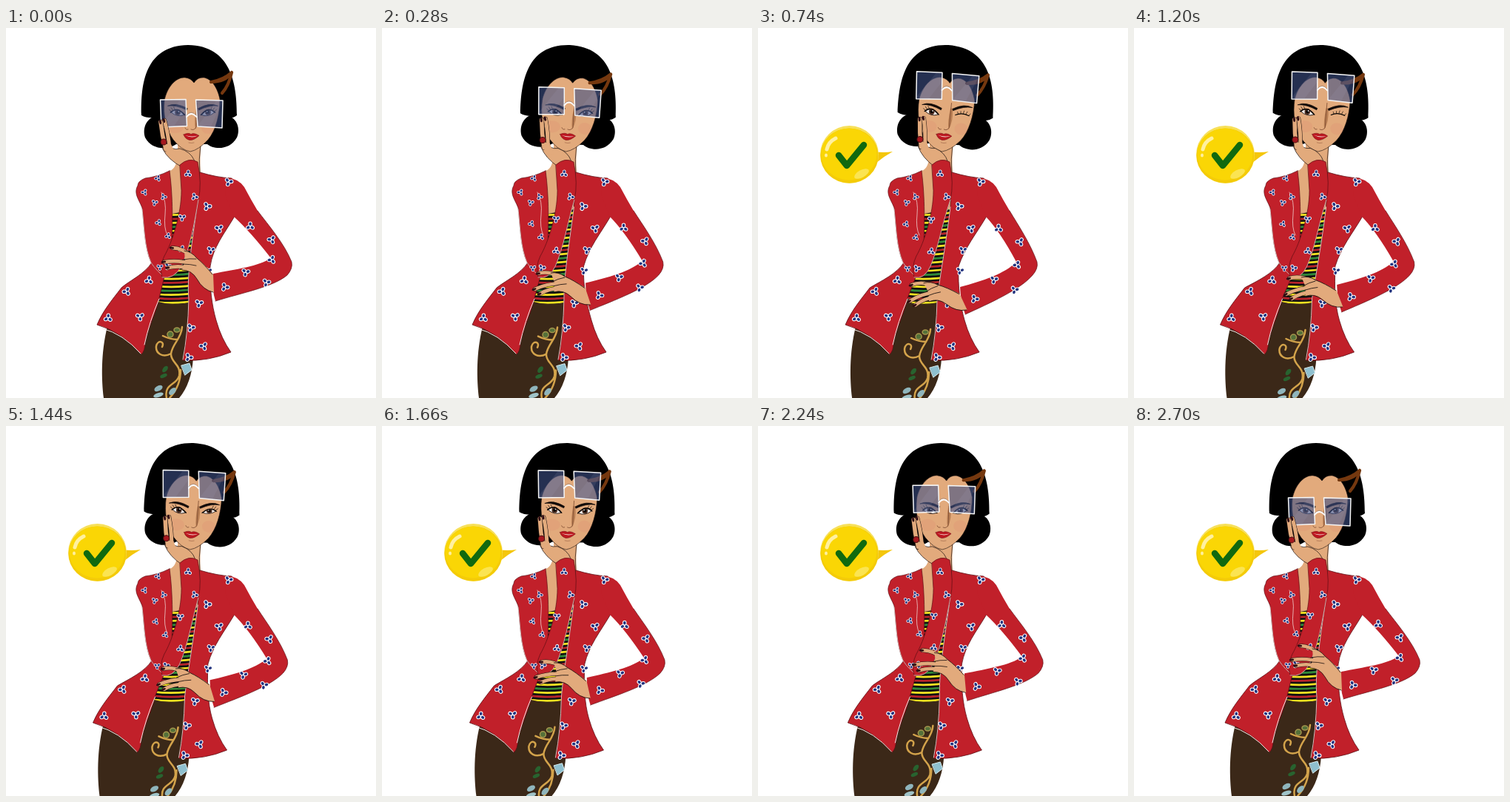
Write an HTML page with a canvas that moves like this. It is 500x500 px and loops after 2760 ms.

```html
<!DOCTYPE html>
<html lang="en">
<head>
<meta charset="utf-8">
<title>Check</title>
<style>
  html, body { margin: 0; width: 100%; height: 100%; overflow: hidden; background: #fff; }
  canvas { display: block; width: 500px; height: 500px; }
</style>
</head>
<body>
<canvas id="stage" width="500" height="500"></canvas>
<script>
const ctx = document.getElementById('stage').getContext('2d');
const LOOP = 2760;
const SKIN = '#e2aa7c', RED = '#c1202a', INK = '#1c1210', BROWN = '#3b2818', NAVY = '#22337f';
const TIMES = [0, 280, 740, 1200, 1660, 2240, 2700, LOOP];
const LEAN = [0, .7, 1, .83, .45, .13, 0, 0];
const HIP = [0, .15, .75, 1, .7, .25, 0, 0];
const LIFT = [0, .43, 1, 1, 1, .46, 0, 0];
const clamp = v => Math.max(0, Math.min(1, v));

function at(t, values) {
  let i = 0;
  while (t >= TIMES[i + 1]) i++;
  return values[i] + (values[i + 1] - values[i]) * (t - TIMES[i]) / (TIMES[i + 1] - TIMES[i]);
}

function shape(d, fill, stroke, width = 1) {
  const path = new Path2D(d);
  if (fill) { ctx.fillStyle = fill; ctx.fill(path); }
  if (stroke) { ctx.strokeStyle = stroke; ctx.lineWidth = width; ctx.stroke(path); }
}

function oval(x, y, rx, ry, fill, angle = 0, stroke, width = 1) {
  ctx.beginPath();
  ctx.ellipse(x, y, rx, ry, angle, 0, 7);
  if (fill) { ctx.fillStyle = fill; ctx.fill(); }
  if (stroke) { ctx.strokeStyle = stroke; ctx.lineWidth = width; ctx.stroke(); }
}

function group(draw, dx = 0, dy = 0, angle = 0, px = 0, py = 0) {
  ctx.save();
  ctx.translate(px + dx, py + dy);
  ctx.rotate(angle);
  ctx.translate(-px, -py);
  draw();
  ctx.restore();
}

function finger(d, width, nail) {
  shape(d, null, INK, width + 1);
  shape(d, null, SKIN, width);
  oval(nail[0], nail[1], 3.2, 1.5, '#300d14', nail[2]);
}

// Three-petal print on the jacket
function flowers(points, dx = 0, dy = 0, size = 1) {
  for (const [x, y] of points) {
    const turn = x * .7 + y;
    for (const layer of [0, 1]) for (let k = 0; k < 3; k++) {
      const a = turn + k * 2.1, r = 3.2 * size;
      const px = x + dx + r * Math.cos(a), py = y + dy + r * Math.sin(a);
      oval(px, py, (layer ? 2.3 : 3.3) * size, (layer ? 1.8 : 2.8) * size, layer ? NAVY : '#fff', a);
    }
  }
}

function bubble(scale) {
  if (!scale) return;
  ctx.save();
  ctx.translate(124, 171);
  ctx.scale(scale, scale);
  ctx.translate(-124, -171);
  shape('M157 167 Q170 169 182 167 Q171 173 160 182Z', '#f4c60c');
  oval(123.5, 171, 39.5, 39, '#f7e05a');
  oval(123.5, 172.5, 39, 37, '#f4cb08');
  oval(123, 170.5, 37.5, 35, '#fad605');
  oval(140, 197, 11, 5, '#fbe452', -.5);
  shape('M93 164 Q95 154 105 149', null, '#fff0a0', 5);
  oval(92, 172, 2, 2.5, '#fff0a0');
  shape('M109 172 L120 186 L143 158', null, '#10690f', 8.5);
  ctx.restore();
}

function buns() {
  shape('M201 119 L301 119 C315 124 316 140 312 148 C302 166 280 164 272 157 L230 157 C218 165 197 165 188 148 C184 135 190 123 201 119Z', '#000');
}

function cap() {
  shape('M183 118 C182 75 188 24 246 23 C304 24 312 75 312 118 Q307 122 301 122 L201 121 Q190 122 183 118Z', '#000');
}

function eye(x, flip, open) {
  ctx.save();
  ctx.translate(x, 114);
  ctx.scale(flip * .88, .88);
  if (open > .3) {
    ctx.save();
    ctx.scale(1, open);
    shape('M-10 0 Q-1 -9 10 4 Q-1 8 -10 0Z', '#f8f1ec', INK, 1);
    oval(0, 0, 4.3, 4.6, '#4a2c20');
    oval(0, 0, 2.2, 2.4, '#000');
    oval(1.4, -1.4, 1, 1, '#fff');
    shape('M-11 0 Q-1 -10 11 4', null, '#000', 1.5);
    ctx.restore();
    shape('M-9 -1 L-13 -4 M-7 -3 L-10 -7 M-4 -4 L-6 -8', null, '#000', .7);
  } else {
    shape('M-11 3 Q0 -2 10 3', null, '#000', 1.3);
    shape('M-10 3 l-3 -3 M-6 1 l-2 -4 M-2 0 l-1 -4 M2 0 l0 -3 M6 1 l1 -3', null, '#000', .7);
  }
  shape('M-15 -10 Q-3 -16 15 -6 L14 -3.5 Q-2 -11.5 -15 -10Z', '#120b09', '#120b09', .8);
  ctx.restore();
}

function glasses(lift) {
  const lenses = ['M208.5 97 L243 96.5 L244.5 132.5 L210 134Z', 'M256.5 97 L293 98 L292 135 L259 133Z'];
  group(() => {
    for (const d of lenses) {
      shape(d, 'rgba(62,80,135,.6)', '#f6f6f6', 1.5);
      ctx.save();
      ctx.clip(new Path2D(d));
      shape('M208 134 L236 96 L244 96 L244 108 L226 134Z M258 134 L286 96 L294 97 L276 135Z', 'rgba(175,180,205,.10)');
      ctx.restore();
    }
    shape('M244 120 Q250 112 257.5 120', null, '#fff', 2);
    shape('M244 118 Q250 110 257 118', null, '#8c7c78', .6);
  }, 0, -36 * lift);
}

function face(wink, lift) {
  shape('M214 98 C218 78 231 66 242 67 Q250 68 254 74 Q259 66 268 67 C281 70 287 86 289 96 C289 116 284 138 273 151 Q260 165 249 167 Q237 165 226 151 C216 137 212 118 214 98Z', SKIN, INK, .6);
  oval(229, 134, 11, 8, 'rgba(220,120,105,.15)');
  oval(273, 135, 9, 8, 'rgba(220,120,105,.15)');
  shape('M257 108 Q254 126 256 137 Q262 126 260 108Z', '#b87e53');
  shape('M258 101 Q257 122 257 134 Q254 139 250 137 M246 137 Q243 138 242 135', null, '#7b4930', .8);
  eye(232, 1, 1);
  eye(273, -1, 1 - wink);
  shape('M240 144 Q246 141 250 143.5 Q254 141 261 145.5 Q254 152 248 151.5 Q242 150 240 144Z', '#bd1720', '#6d1015', .5);
  shape('M242 145 Q250 147.5 259 145.5 Q251 149.5 242 145Z', '#f3d5cc');
  shape('M247 155 Q251 156 254 155', null, '#a36c4c', .7);
  shape('M277 73 Q297 73 305 60 Q301 78 292 88 M277 73 Q294 70 305 60', null, '#75380f', 4.2);
  glasses(lift);
}

function sash(h) {
  const colors = ['#f3e221', '#101010', '#2f8a38', '#101010', '#f3e221', '#101010', '#b8232a', '#101010'];
  ctx.save();
  ctx.clip(new Path2D(`M219 252 L264 244 L254 320 L${248 + h} 374 Q${225 + h} 380 ${205 + h} 373 L206 338Z`));
  for (let y = 240, i = 0; y < 384; y += 2.7, i++)
    shape(`M195 ${y} Q228 ${y + 5} 266 ${y - 2}`, null, colors[i % 8], 3.2);
  ctx.restore();
}

function skirt() {
  shape('M137 403 C128 440 129 475 132 500 L234 500 Q251 480 253 445 L247 371 Q226 376 206 370 L170 395Z', BROWN);
}

function ornament() {
  shape('M238 404 C237 420 225 426 223 440 C222 452 237 454 234 470 C231 483 213 480 217 500 M223 440 C212 446 202 440 203 430 C205 421 215 423 211 431 M232 421 Q222 421 212 416 M236 462 Q236 484 221 500', null, '#d3a34b', 2.5);
  oval(222, 414, 4, 4, '#54713a', 0, '#a3964c', 1.5);
  oval(231, 408, 4, 3, '#54713a', 0, '#a3964c', 1.5);
  shape('M237 456 L248 453 L251 462 L242 469Z', '#8fc0cf', '#d8edf0', 1);
  oval(206, 487, 6, 3.5, '#8fb5bc', -.5);
  oval(206, 496, 7, 3, '#9fc3c8', -.3);
  oval(225, 491, 6, 3.5, '#8fb5bc', -.8);
  oval(215, 461, 5, 3, '#28632f', -.9);
  oval(213, 470, 5, 2.5, '#28632f', -.4);
}

function jacket(p, h) {
  const edge = '#f5e9e6', dark = '#5d0d14';
  shape(`M197 317 C188 332 166 342 ${156 + h} 351 C${143 + h} 368 ${131 + h} 382 ${123 + h} 401 Q${155 + h} 410 ${183 + h} 441 Q${188 + h} 436 ${188 + h} 425 C${193 + h} 402 ${203 + h} 384 ${207 + h} 365 L215 332Z`, RED, dark, .8);
  shape(`M${130 + h} 406 Q${158 + h} 413 ${182 + h} 440 M${187 + h} 428 Q${194 + h} 396 ${207 + h} 366`, null, edge, 1);
  const w = 5 * p;
  const inner = `Q${246 + h} 412 ${247 + h} 366 C${244 + 2 * p} 335 ${252 + 3 * p} 285 ${258 + 2 * p} 242`;
  shape(`M262 195 Q285 202 305 203 L318 222 L308 256 C295 278 280 296 ${276 - w} 322 C${275 - w} 350 ${278 + h} 374 ${284 + h} 395 Q${291 + h} 420 ${304 + h} 438 Q${273 + h} 451 ${239 + h} 449 ${inner}Z`, RED, dark, .8);
  shape(`M${239 + h} 448 ${inner}`, null, edge, .8);
  const outer = `C${355 - 3 * p} 267 ${376 - 8 * p} 291 ${386 - 9 * p} 316 Q${388 - 9 * p} 325 ${380 - 9 * p} 334 C${361 - 6 * p} ${350 + 3 * p} ${318 - 5 * p} ${358 + 14 * p} ${283 - 3 * p} ${369 + 18 * p}`;
  shape(`M297 203 Q313 202 322 215 Q331 232 340 247 ${outer} Q${278 - 4 * p} ${353 + 18 * p} ${280 - 7 * p} ${332 + 18 * p} C${310 - 7 * p} ${326 + 16 * p} ${342 - 8 * p} ${322 + 10 * p} ${358 - 9 * p} ${311 + 5 * p} Q${330 - 3 * p} 275 308 255 L296 225Z`, RED);
  shape(`M340 247 ${outer}`, null, dark, .7);
  shape('M221 193 Q205 201 188 203 Q178 207 178 213 C172 224 180 232 184 243 C187 270 187 296 196 317 Q204 329 214 336 L224 293 C225 270 226 230 221 193Z', RED, dark, .7);
  shape('M210 222 Q217 234 215 252 T218 280 M184 245 C187 270 187 296 196 317 Q204 329 214 336', null, edge, .7);
}

function cheekHand() {
  shape('M212 155 Q224 166 235 163 Q249 167 254 178 L257 184 L238 188 Q219 178 212 164Z', SKIN, INK, .7);
  finger('M214 125 Q219 142 221 162', 5, [213.5, 125, 1.3]);
  finger('M209 127 Q211 146 216 164', 5.5, [208.5, 127, 1.4]);
  shape('M214 157 L223 157 L231 174 L217 169Z', SKIN);
  oval(213, 154, 4, 4, '#a5181f', 0, '#4a1010', 1);
}

function forearm(p) {
  const edge = `C${254 - 6 * p} 267 ${249 - 5 * p} 296 ${237 - 4 * p} 322 Q${227 - 2 * p} 340 211 337`;
  shape(`M235 185 Q247 174 259 181 Q265 211 260 232 ${edge} Q207 322 214 308 C224 291 237 252 237 220Z`, RED, '#5d0d14', .7);
  shape(`M260 232 ${edge}`, null, '#f5e9e6', .7);
}

function waistHand() {
  finger('M252 309 Q238 297 225 297', 4.6, [224, 297, .1]);
  finger('M250 325 Q234 320 219 324', 4.6, [218, 324, -.1]);
  finger('M252 319 Q234 313 214 316', 4.6, [213, 316, -.1]);
  shape('M241 301 Q251 302 258 311 Q268 319 280 333 L281 357 Q266 354 258 339 Q251 327 238 327 L242 314Z', SKIN);
  shape('M241 301 Q251 302 258 311 Q268 319 279 333 M280 357 Q266 354 258 339 Q251 327 238 327 M257 312 Q248 311 239 313 M257 321 Q249 319 240 319', null, INK, .8);
}

function draw(t) {
  const p = at(t, LEAN), hip = at(t, HIP), h = -6.5 * hip, lift = at(t, LIFT);
  const wink = clamp((t - 360) / 180) * clamp((1480 - t) / 180);
  const tilt = .06 * p;
  ctx.fillStyle = '#fff';
  ctx.fillRect(0, 0, 500, 500);
  ctx.lineCap = ctx.lineJoin = 'round';

  bubble(clamp((t - 300) / 200));
  group(buns, 0, 0, tilt, 250, 160);
  group(cap, 3 * p, 0, tilt, 250, 160);
  shape('M232 150 L265 148 Q261 175 263 197 L260 262 L221 262 L221 193 Q232 190 232 165Z', SKIN);
  shape('M263 158 Q260 178 262 196', null, INK, .7);
  group(() => face(wink, lift), 0, 0, tilt, 250, 160);

  sash(h);
  group(skirt, h);
  group(ornament, h, 4 * hip);
  jacket(p, h);
  group(cheekHand, 2 * p, 0, .14 * p, 240, 180);
  forearm(p);

  flowers([[205, 203], [187, 222], [213, 228], [201, 236]], 0, 0, .75);
  flowers([[206, 263], [219, 281], [208, 323]], -6 * p, 2 * p, .75);
  flowers([[246, 197], [255, 228]], 0, 0, .85);
  flowers([[238, 256], [238, 299], [219, 322]], -4 * p, 3 * p, .85);
  flowers([[301, 208], [272, 241], [288, 271]]);
  flowers([[277, 300], [273, 328]], 0, 0, .95);
  flowers([[330, 268], [359, 286]], -5 * p, 3 * p);
  flowers([[359, 313]], -9 * p, 7 * p);
  flowers([[324, 330], [352, 344]], -5 * p, 10 * p);
  flowers([[296, 350]], -3 * p, 16 * p);
  flowers([[193, 341], [163, 356], [181, 390], [138, 392], [261, 372], [250, 405], [267, 430], [247, 445]], h);

  group(waistHand, -3 * p, 25 * p, -.4 * p, 280, 345);
}

function frame() {
  draw(performance.now() % LOOP);
  requestAnimationFrame(frame);
}
frame();
</script>
</body>
</html>
```
